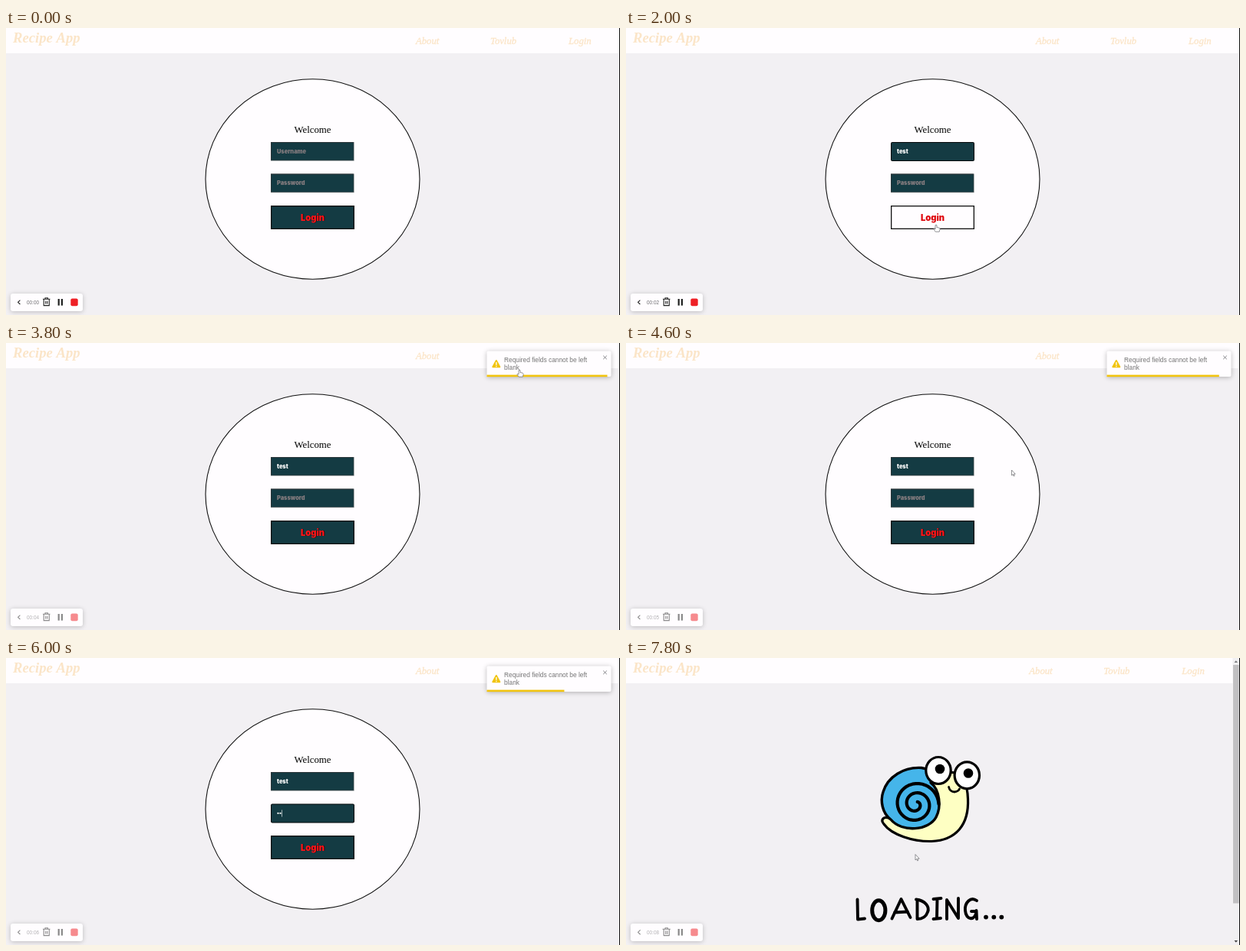
An HTML page with a canvas that plays this animation: 800 px wide and 375 px high, repeating every 8000 ms.

```html
<!DOCTYPE html>
<html lang="en">
<head>
<meta charset="utf-8">
<title>Recipe App</title>
<style>
html, body { margin: 0; width: 100%; height: 100%; overflow: hidden; background: #f2f0f3; }
canvas { display: block; width: 800px; height: 375px; }
</style>
</head>
<body>
<canvas id="stage" width="800" height="375"></canvas>
<script>
const ctx = document.getElementById('stage').getContext('2d');
const LOOP = 8000, STEP = 200;
const SERIF = '"Liberation Serif", serif';
const SANS = '"Liberation Sans", sans-serif';
const HEAVY = 'Inter, "Open Sans", sans-serif';
const TEAL = '#143b43', PEACH = '#fbe5c8', INK = '#101010';

// time, x, y of the pointer tip
const PATH = [
  [1600, 425, 170], [1800, 415, 225], [2000, 404, 257], [2200, 403, 256],
  [2400, 403, 256], [2600, 403, 249], [3200, 403, 249], [3400, 520, 140],
  [3600, 650, 50], [3800, 669, 35], [4200, 669, 35], [4400, 600, 90],
  [4800, 405, 242], [5200, 401, 257], [5400, 395, 205], [5600, 393, 200],
  [6400, 386, 226], [6600, 382, 257], [7600, 382, 257], [7800, 377, 257]
];

function pointer(t) {
  if (t < 1600 || (t > 5600 && t < 6400)) return null;
  const i = PATH.findIndex(p => p[0] >= t);
  const b = PATH[i], a = PATH[Math.max(0, i - 1)];
  const k = b[0] > a[0] ? (t - a[0]) / (b[0] - a[0]) : 1;
  return { x: a[1] + (b[1] - a[1]) * k, y: a[2] + (b[2] - a[2]) * k };
}

const inside = (p, x, y, w, h) => !!p && p.x >= x && p.x <= x + w && p.y >= y && p.y <= y + h;

function rect(x, y, w, h, color) {
  ctx.fillStyle = color;
  ctx.fillRect(x, y, w, h);
}

function round(x, y, w, h, r, color) {
  ctx.beginPath();
  ctx.roundRect(x, y, w, h, r);
  ctx.fillStyle = color;
  ctx.fill();
}

function text(str, x, y, font, color, align = 'left') {
  ctx.font = font;
  ctx.textAlign = align;
  ctx.fillStyle = color;
  ctx.fillText(str, x, y);
}

function shape(d, fill, stroke, width = 1) {
  const p = new Path2D(d);
  if (fill) { ctx.fillStyle = fill; ctx.fill(p); }
  if (stroke) { ctx.strokeStyle = stroke; ctx.lineWidth = width; ctx.stroke(p); }
}

function oval(x, y, rx, ry, fill, stroke, width = 1) {
  ctx.beginPath();
  ctx.ellipse(x, y, rx, ry, 0, 0, Math.PI * 2);
  if (fill) { ctx.fillStyle = fill; ctx.fill(); }
  if (stroke) { ctx.strokeStyle = stroke; ctx.lineWidth = width; ctx.stroke(); }
}

function card(x, y, w, h, r, blur, alpha) {
  ctx.save();
  ctx.shadowColor = `rgba(0,0,0,${alpha})`;
  ctx.shadowBlur = blur;
  ctx.shadowOffsetY = 1;
  round(x, y, w, h, r, '#fffdff');
  ctx.restore();
}

function nav(shift) {
  rect(0, 0, 800, 33, '#fffdff');
  text('Recipe App', 9, 19, `italic bold 18.7px ${SERIF}`, PEACH);
  ctx.strokeStyle = PEACH;
  ctx.lineWidth = 0.35;
  [['About', 534], ['Tovlub', 631], ['Login', 733]].forEach(([word, x]) => {
    text(word, x - shift, 21, `italic 12.7px ${SERIF}`, PEACH);
    ctx.strokeText(word, x - shift, 21);
  });
}

function field(y, value, hint, focus, caret) {
  if (focus) {
    round(345, y, 109, 25, 2, '#05090a');
    round(346, y + 1, 107, 23, 1, TEAL);
  } else {
    rect(345, y, 108.6, 24.6, '#71797b');
    rect(345, y, 107.8, 23.8, '#2a3538');
    rect(346, y + 1, 106.6, 22.6, TEAL);
  }
  const font = `900 7.4px ${HEAVY}`;
  text(value || hint, 353, y + 14.8, font, value ? '#fff' : '#857c7f');
  if (focus && caret) {
    const w = value ? ctx.measureText(value).width : 0;
    rect(353.3 + w, y + 8, 0.7, 9, '#dfe5e6');
  }
}

function button(hover, color) {
  rect(345, 232, 109, 31, INK);
  rect(346.3, 233.3, 106.4, 28.4, hover ? '#fffdff' : TEAL);
  const font = `900 11.2px ${HEAVY}`;
  if (!hover) text('Login', 400.2, 252.2, font, '#1a0506', 'center');
  text('Login', 399.5, 251.5, font, color, 'center');
}

function toolbar(t) {
  card(6, 347, 94, 23, 3, 6, 0.22);
  ctx.save();
  ctx.globalAlpha = t < 3400 ? 1 : t < 3600 ? 0.75 : 0.52;
  const sec = Math.floor((t + 400) / 1000);
  shape('M18.4 355.6L15.6 358.3L18.4 361', null, '#222', 1.1);
  text('00:0' + sec, 27, 360.6, `6.4px ${SANS}`, '#6d6d70');
  shape('M48 354.2H57.5M51 354V352.8H54.5V354M49.2 354.5V362.6H56.3V354.5M51.7 356.8V360.5M53.8 356.8V360.5', null, '#222', 1.1);
  rect(67.6, 354, 2.2, 8.6, '#222');
  rect(71.8, 354, 2.2, 8.6, '#222');
  round(84.3, 353.6, 9.4, 9.6, 2, '#ee2026');
  ctx.restore();
}

function toast(t) {
  if (t < 3200) return;
  const dx = t < 3400 ? -10.5 : t < 3600 ? 5 : 0;
  const active = t < 4270 ? Math.min(t - 3200, 155) : t - 4115;
  ctx.save();
  ctx.translate(dx, 0);
  card(626.5, 10.5, 162, 33.5, 2, 6, 0.28);
  rect(626.5, 41.6, 162 * (1 - active / 5000), 2.6, '#f1c40f');
  ctx.lineJoin = 'round';
  shape('M638.8 23L643.3 31.3H634.3Z', '#f1c40f', '#f1c40f', 2);
  rect(638.2, 25, 1.3, 3.8, '#fff');
  rect(638.2, 29.8, 1.3, 1.4, '#fff');
  const font = `8.35px ${SANS}`;
  text('Required fields cannot be left', 649, 25.4, font, '#757575');
  text('blank', 649, 35, font, '#757575');
  shape('M778.2 16.6L782.8 21.2M782.8 16.6L778.2 21.2', null, '#85858a', 1);
  ctx.restore();
}

function cursor(p, kind) {
  if (!p) return;
  ctx.save();
  ctx.translate(p.x, p.y);
  ctx.lineJoin = 'round';
  if (kind === 'hand') {
    shape('M-1 .8Q0-.6 1 .8V3.8Q2 3 2.8 4Q4 3.4 4.6 4.8Q5.2 5 5 6.5L4.2 9.2H-.8L-3.2 6Q-3 4.6-1 6Z', '#fff', '#77777b', 0.8);
  } else if (kind === 'beam') {
    shape('M-1.5-4H1.5M0-4V4M-1.5 4H1.5', null, '#9aa3a5', 0.8);
  } else {
    shape('M0 0V7L1.6 5.6L2.7 8L3.8 7.5L2.7 5.2H4.8Z', '#fff', '#66666a', 0.7);
  }
  ctx.restore();
}

function form(t) {
  nav(0);
  oval(399.5, 197.5, 139.5, 130.7, '#fffdff', INK, 1.1);
  text('Welcome', 399.5, 137, `12.8px ${SERIF}`, '#000', 'center');

  const p = pointer(t);
  const overButton = inside(p, 345, 232, 109, 31);
  const overField = inside(p, 345, 149, 109, 25) || inside(p, 345, 190, 109, 25);
  const overToast = t >= 3600 && inside(p, 626, 10, 163, 34);

  const name = t < 600 ? '' : t < 800 ? 't' : t < 1200 ? 'te' : 'test';
  const dots = Math.max(0, Math.min(3, Math.floor((t - 5600) / STEP)));
  field(149, name, 'Username', t >= 200 && t < 2600, t < 1600);
  field(190.5, '•'.repeat(dots), 'Password', t >= 5600 && t < 7400, t < 7000);
  const late = t >= 6600 && t < 7000;
  button(overButton, !overButton ? '#ff1418' : late ? TEAL : '#df0a10');
  toast(t);
  toolbar(t);
  cursor(p, overButton || overToast ? 'hand' : overField ? 'beam' : 'arrow');
}

function snail() {
  ctx.lineJoin = ctx.lineCap = 'round';
  // body
  shape('M344 210C336 206 331 211 336 217C346 231 374 240 398 239.5C430 238 447 218 445.5 184C445 168 441 154 428 150C414 147 402 153 397 163L400 200Z', '#feffc3', '#000', 3.2);
  // shell
  shape('M345 211C334 203 331 187 335 175C341 155 362 142 385 143.5Q395 145 401 153L397 163C409 172 411 195 404 208C395 225 360 229 345 211Z', '#45b5ea', '#000', 3.4);
  ctx.beginPath();
  for (let a = 0; a <= 8.6; a += 0.1) {
    const r = 30 - a * 3.05, th = -a * Math.PI / 2;
    ctx.lineTo(377.5 + r * Math.cos(th), 191 + r * Math.sin(th));
  }
  ctx.lineWidth = 4.2;
  ctx.stroke();
  // face
  [[407, 147, 409, 145], [444.3, 153.3, 446, 150.5]].forEach(([x, y, px, py]) => {
    oval(x, y, 16.2, 17.5, '#fff', '#000', 3.2);
    oval(px, py, 6.3, 6.3, '#000');
  });
  shape('M420.5 168.5Q422 175 428 175Q433 174.5 434.5 171', null, '#000', 2.8);
}

function lettering() {
  [
    'M301.5 315.5L302 341.5L311 340.5',
    'M346.5 340.5L358.5 315L370.5 339M350 332.5L367 331.5',
    'M379.5 316V341M378 315.5C390 317 396 325 393 332C391 338 386 341 379.5 341',
    'M400.5 315L410.5 314M405.5 315L405 340M400.5 341L410 340',
    'M418 341V316L433 340V314',
    'M457 317C449 311 441 320 442 330C443 343 455 344 456.5 331H450M456.5 330L457 341'
  ].forEach(d => shape(d, null, '#000', 3.9));
  oval(329.3, 329.7, 8.6, 13, null, '#000', 5);
  [469, 479.3, 489.3].forEach(x => oval(x, 338.6, 2.9, 2.9, '#000'));
}

function scrollbar() {
  rect(790.5, 0, 9, 375, '#f1f0f2');
  rect(791, 9, 7.6, 311.5, '#c1c0c2');
  shape('M792.5 6L794.8 3.2L797 6Z', '#77777a');
  shape('M792.5 369L794.8 371.8L797 369Z', '#444');
}

function loading(t) {
  nav(8.7);
  snail();
  lettering();
  scrollbar();
  toolbar(t);
  cursor(pointer(t), 'arrow');
}

function draw(now) {
  const t = Math.floor((now % LOOP) / STEP) * STEP;
  ctx.lineCap = 'butt';
  rect(0, 0, 800, 375, '#f2f0f3');
  (t < 7800 ? form : loading)(t);
  rect(799, 0, 1, 375, '#111');
}

const start = performance.now();
function tick() {
  draw(performance.now() - start);
  requestAnimationFrame(tick);
}
tick();
</script>
</body>
</html>
```
